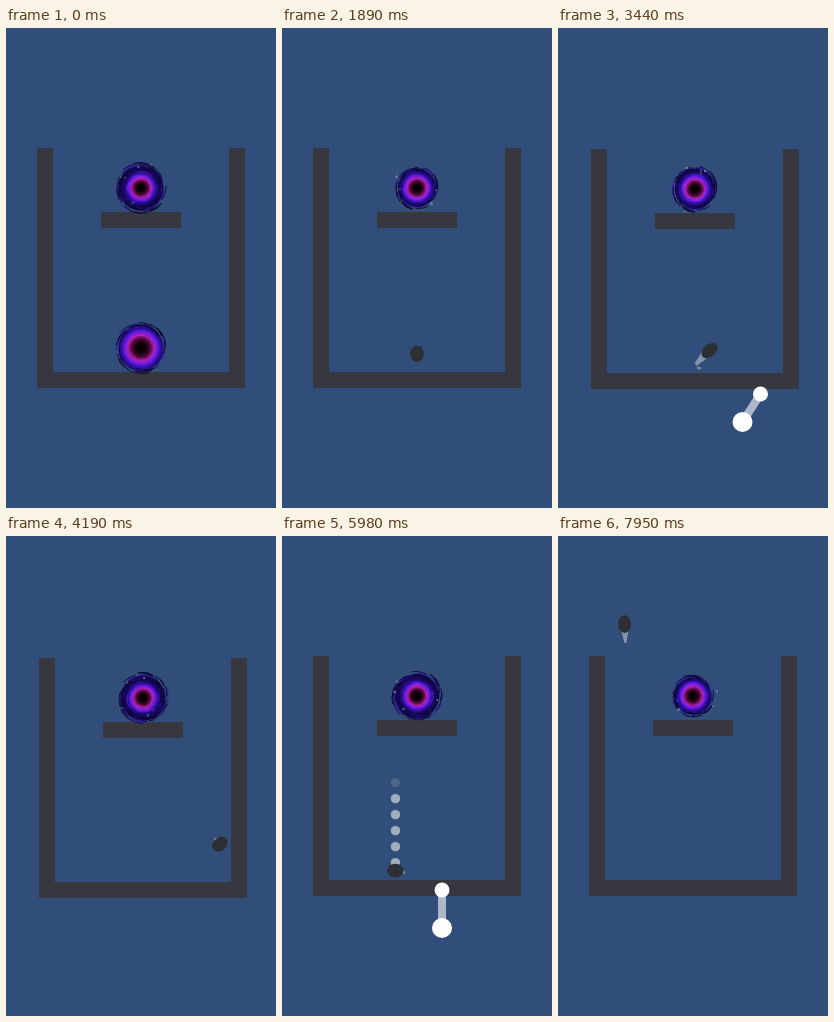
These frames come from a looping animation (270x480 px, 8 s). An HTML page with a canvas:

```html
<!DOCTYPE html>
<html lang="en">
<head>
<meta charset="utf-8">
<title>Portal ball</title>
<style>
  html, body { margin: 0; width: 100%; height: 100%; overflow: hidden; background: #314d79; }
  canvas { display: block; width: 270px; height: 480px; }
</style>
</head>
<body>
<canvas id="stage"></canvas>
<script>
const LOOP = 8000;
const TAU = Math.PI * 2;
const GRAVITY = 0.000174; // px per ms squared
const FLOOR_Y = 336.5;
const BOUNCE = 0.61;
const DROP = 1630, LAUNCH_1 = 3290, WALL_HIT = 4122, LAUNCH_2 = 6722;

const canvas = document.getElementById('stage');
const ctx = canvas.getContext('2d');
const ratio = window.devicePixelRatio || 1;
canvas.width = 270 * ratio;
canvas.height = 480 * ratio;

const clamp = (v, lo = 0, hi = 1) => Math.min(hi, Math.max(lo, v));
const noise = n => {
  const s = Math.sin(n * 127.1 + 11.7) * 43758.5453;
  return s - Math.floor(s);
};

// Linear interpolation through [time, ...values] rows.
function track(rows, t) {
  let i = 1;
  while (i < rows.length - 1 && t > rows[i][0]) i++;
  const a = rows[i - 1], b = rows[i];
  const k = clamp((t - a[0]) / (b[0] - a[0]));
  return a.slice(1).map((v, j) => v + (b[j + 1] - v) * k);
}

function disc(x, y, r, color) {
  ctx.fillStyle = color;
  ctx.beginPath();
  ctx.arc(x, y, Math.max(0, r), 0, TAU);
  ctx.fill();
}

// Height and upward speed of a ball that keeps bouncing on the floor.
function hop(dt, speed) {
  let flight = 2 * speed / GRAVITY;
  while (dt > flight && speed > 0.008) {
    dt -= flight;
    speed *= BOUNCE;
    flight = 2 * speed / GRAVITY;
  }
  if (dt > flight) return [0, 0];
  return [speed * dt - GRAVITY * dt * dt / 2, speed - GRAVITY * dt];
}

function ballAt(t) {
  let x = 135, vx = 0;
  if (t >= LAUNCH_2) { vx = -0.005; x = 72.7 + vx * (t - LAUNCH_2); }
  else if (t >= WALL_HIT) { vx = -0.055; x = 215.7 + vx * (t - WALL_HIT); }
  else if (t >= LAUNCH_1) { vx = 0.097; x = 135 + vx * (t - LAUNCH_1); }

  let height = 16.5, up = 0;
  if (t >= LAUNCH_2) [height, up] = hop(t - LAUNCH_2, 0.309);
  else if (t >= LAUNCH_1) [height, up] = hop(t - LAUNCH_1, 0.112);
  else if (t >= DROP) [height, up] = hop(t - DROP + 435, 0.0758);
  return { x, y: FLOOR_Y - height, vx, vy: -up };
}

function drawTrail(t) {
  const steps = 12, left = [], right = [];
  for (let i = 0; i <= steps; i++) {
    const p = ballAt(Math.max(DROP, t - i * 170 / steps));
    const angle = Math.atan2(p.vy, p.vx) + Math.PI / 2;
    const w = 5.3 - 4.3 * i / steps;
    left.push([p.x + Math.cos(angle) * w, p.y + Math.sin(angle) * w]);
    right.unshift([p.x - Math.cos(angle) * w, p.y - Math.sin(angle) * w]);
  }
  ctx.fillStyle = 'rgba(235,235,240,.45)';
  ctx.beginPath();
  left.concat(right).forEach(p => ctx.lineTo(p[0], p[1]));
  ctx.fill();
}

function drawBall(t) {
  const b = ballAt(t);
  const stretch = 1 + Math.hypot(b.vx, b.vy) * 1.8;
  const r = 7.5 * clamp((t - 1400) / 230);
  ctx.fillStyle = '#2e2f32';
  ctx.beginPath();
  ctx.ellipse(b.x, b.y, r * stretch, r / stretch, Math.atan2(b.vy, b.vx), 0, TAU);
  ctx.fill();
}

function drawPortal(x, y, radius, core, t, seed) {
  const glow = ctx.createRadialGradient(x, y, 0, x, y, radius);
  const stop = (px, color) => glow.addColorStop(clamp(px * core / radius), color);
  stop(0, '#000');
  stop(3.5, '#0c0106');
  stop(7, '#520b38');
  stop(9.8, '#b01fb4');
  stop(12, '#6d1bef');
  stop(14.5, '#2d0f9c');
  stop(17.5, '#130750');
  glow.addColorStop(1, '#0b0432');
  disc(x, y, radius * 0.87, glow);

  const hues = ['#0a0430', '#12064a', '#3015a8', '#0a0430'];
  for (let i = 0; i < 84; i++) {
    const n = seed + i * 4;
    const rim = i < 44;
    const depth = rim ? 0.84 + 0.16 * noise(n) : 0.5 + 0.36 * noise(n);
    const start = noise(n + 1) * TAU + t * TAU / LOOP * (rim ? 5 : 7);
    const sweep = 0.2 + 0.55 * noise(n + 2);
    ctx.strokeStyle = rim ? hues[i % 4] : depth < 0.66 ? '#8a30ff' : '#3c1cc4';
    ctx.globalAlpha = rim ? 0.9 : 0.4;
    ctx.lineWidth = rim ? 1 : 0.7;
    ctx.beginPath();
    for (let k = 0; k <= 5; k++) {
      const a = start + sweep * k / 5;
      const r = radius * (depth - 0.05 * k / 5);
      ctx.lineTo(x + Math.cos(a) * r, y + Math.sin(a) * r);
    }
    ctx.stroke();
  }
  // fine swirl inside the bright ring
  for (let i = 0; i < 16; i++) {
    const a = noise(seed + 500 + i) * TAU + t * TAU / LOOP * 8;
    ctx.globalAlpha = 0.35;
    ctx.strokeStyle = i % 2 ? '#e040c0' : '#58106a';
    ctx.lineWidth = 0.6;
    ctx.beginPath();
    ctx.arc(x, y, core * (7.5 + 4.5 * noise(seed + 540 + i)), a, a + 1);
    ctx.stroke();
  }
  ctx.globalAlpha = 1;
}

function drawSparks(x, y, t) {
  for (let i = 0; i < 6; i++) {
    const clock = t / 800 + i / 6;
    const life = clock % 1;
    const n = Math.floor(clock) * 7 + i * 31;
    const a = noise(n) * TAU + life * 0.6;
    const r = 15 + 12 * life;
    ctx.globalAlpha = 0.6 * Math.sin(life * Math.PI);
    disc(x + Math.cos(a) * r, y + Math.sin(a) * r, 0.8 + 0.7 * noise(n + 3), '#a4abc0');
  }
  ctx.globalAlpha = 1;
}

function drawBurst(x, y, age, span, color) {
  if (age < 0 || age > span) return;
  ctx.globalAlpha = 0.6 * (1 - age / span);
  for (let i = 0; i < 5; i++) {
    const a = Math.PI + noise(i + 90) * Math.PI;
    const r = 2 + age * 0.04 * noise(i + 70);
    disc(x + Math.cos(a) * r, y + Math.sin(a) * r * 0.6, 1.2, color);
  }
  ctx.globalAlpha = 1;
}

const drags = [
  { from: 2400, to: 3475, launch: LAUNCH_1, path: [
    [2400, 200.5, 365], [2650, 207, 375], [2850, 211, 386], [3020, 203, 394], [3280, 182.5, 393]] },
  { from: 5500, to: 6722, launch: LAUNCH_2, path: [
    [5500, 160, 354], [5730, 160, 374], [5980, 160, 392], [6560, 160, 420], [6700, 158, 423]] }
];

function drawAim(drag, t) {
  const [, x0, y0] = drag.path[0];
  const [x, y] = track(drag.path, t);
  const length = Math.hypot(x0 - x, y0 - y);
  if (t >= drag.launch || length < 1) return;
  const b = ballAt(t), reach = length * 2.4;
  for (let d = 8; d < reach; d += 16) {
    const fade = clamp((reach - d + 2) / 20);
    disc(b.x + (x0 - x) / length * d, b.y + (y0 - y) / length * d, 4.7,
      `rgba(245,245,245,${0.57 * fade})`);
  }
}

function drawStick(drag, t) {
  const [, x0, y0] = drag.path[0];
  const [x, y] = track(drag.path, t);
  ctx.strokeStyle = 'rgba(255,255,255,.6)';
  ctx.lineWidth = 8;
  ctx.beginPath();
  ctx.moveTo(x0, y0);
  ctx.lineTo(x, y);
  ctx.stroke();
  disc(x0, y0, 7.5, '#fff');
  disc(x, y, 10, '#fff');
}

function shake(t) {
  for (const [start, span] of [[3360, 300], [WALL_HIT, 260]]) {
    const age = t - start;
    if (age < 0 || age > span) continue;
    const size = 3 * (1 - age / span);
    return [Math.round(size * Math.abs(Math.sin(age / 45))), Math.round(size * Math.sin(age / 30))];
  }
  return [0, 0];
}

const pulse = [[0, 0], [1890, 2.25], [3440, 4.2], [4840, 5.73], [5980, 7.07], [7140, 8.5], [7950, 9.27], [8000, 9.32]];

function draw(t) {
  ctx.setTransform(ratio, 0, 0, ratio, 0, 0);
  ctx.fillStyle = '#314d79';
  ctx.fillRect(0, 0, 270, 480);
  ctx.translate(...shake(t));

  const drag = drags.find(d => t >= d.from && t < d.to);
  ctx.fillStyle = '#36373f';
  ctx.fillRect(31, 120, 16, 240);
  ctx.fillRect(223, 120, 16, 240);
  ctx.fillRect(31, 344, 208, 16);
  ctx.fillRect(95, 184, 80, 16);

  const [phase] = track(pulse, t);
  drawPortal(135, 160, 22 + 4 * Math.cos(phase * TAU), 1, t, 1);
  drawSparks(135, 160, t);

  const open = 1 - clamp((t - 1150) / 500) ** 2;
  if (open > 0.02) drawPortal(135, 320, 26 * open, 1.35 * open, t, 900);
  drawBurst(133, 322, t - 1600, 420, '#1d2f63');
  drawBurst(136, 341, t - LAUNCH_1, 350, '#b4b4b8');

  if (drag) drawAim(drag, t);
  if (t > DROP) drawTrail(t);
  if (t > 1400) drawBall(t);
  if (drag) drawStick(drag, t);
}

const begin = performance.now();
function tick() {
  draw((performance.now() - begin) % LOOP);
  requestAnimationFrame(tick);
}
tick();
</script>
</body>
</html>
```
